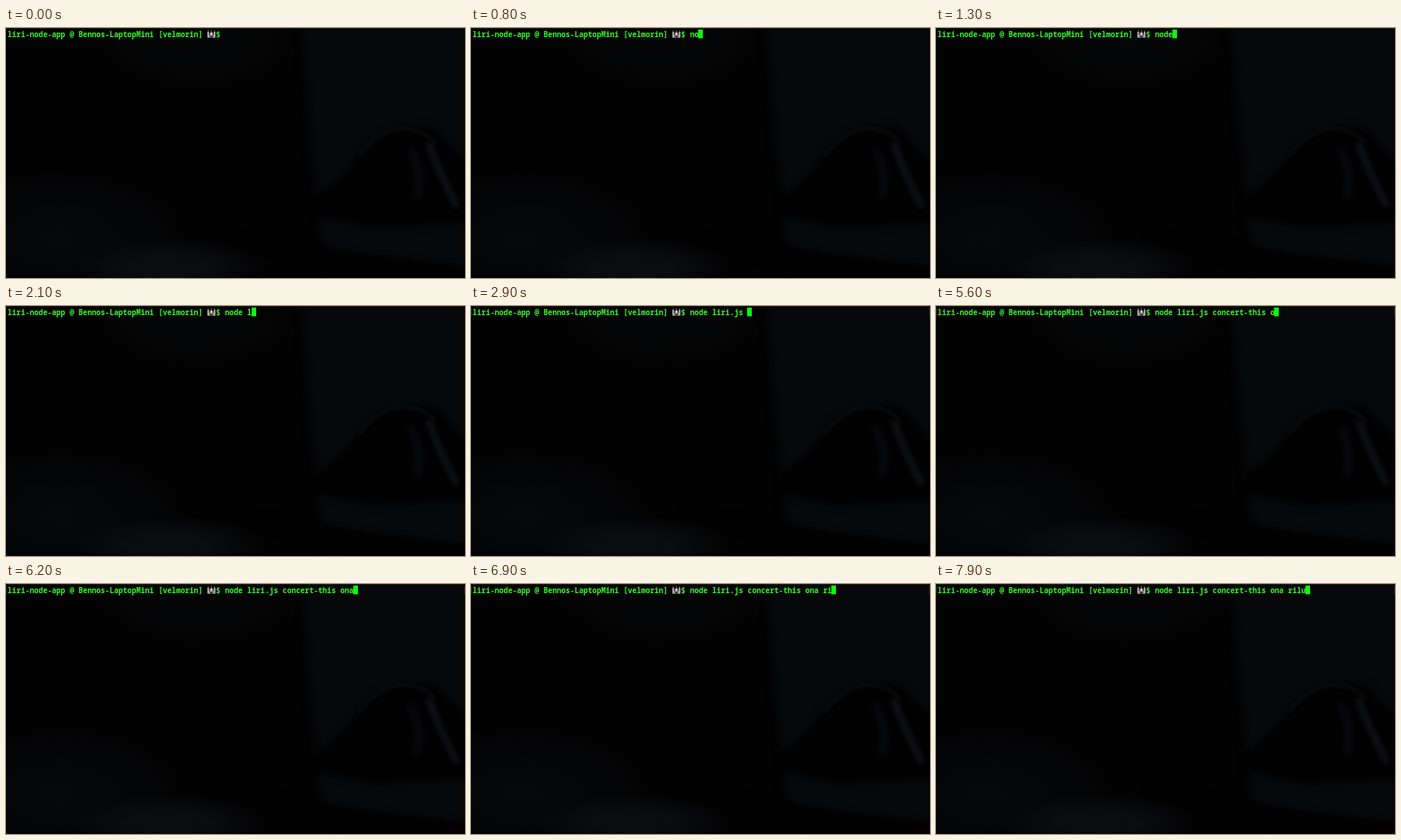
These frames come from a looping animation (600x328 px, 8 s). An HTML page with a canvas:

```html
<!DOCTYPE html>
<html lang="en">
<head>
<meta charset="utf-8">
<title>Terminal</title>
<style>
  html, body { margin: 0; width: 100%; height: 100%; overflow: hidden; background: #010102; }
  canvas { display: block; width: 600px; height: 328px; }
</style>
</head>
<body>
<canvas id="stage"></canvas>
<script>
const W = 600, H = 328, LOOP = 8000;
const CELL = 5.8, LEFT = 2, BASE = 12;
const GREEN = '#32fa24', CURSOR = '#08ff0c';
const PROMPT = 'liri-node-app @ Bennos-LaptopMini [velmorin] ';
const CASTLE_COL = PROMPT.length, DOLLAR_COL = CASTLE_COL + 2, INPUT_COL = DOLLAR_COL + 2;
const COMMAND = 'node liri.js concert-this ona rilu';

// [time in ms, characters of the command on screen]
const KEYS = [
  [0, 0], [600, 1], [800, 2], [1100, 3], [1300, 4], [1500, 5],
  [1900, 6], [2200, 7], [2900, 13], [3600, 25], [4400, 26],
  [5600, 27], [5800, 28], [6000, 29], [6300, 30],
  [6600, 31], [6900, 32], [7300, 33], [7500, 34]
];
const CURSOR_ON = 100, MARKS_ON = 2900;

const dpr = window.devicePixelRatio || 1;

function prepare(canvas) {
  canvas.width = W * dpr;
  canvas.height = H * dpr;
  const c = canvas.getContext('2d');
  c.scale(dpr, dpr);
  return c;
}

const ctx = prepare(document.getElementById('stage'));
const backdrop = document.createElement('canvas');
paintBackdrop(prepare(backdrop));

function rect(c, color, x, y, w, h) {
  c.fillStyle = color;
  c.fillRect(x, y, w, h);
}

function glow(c, x, y, rx, ry, rgb, alpha) {
  c.save();
  c.translate(x, y);
  c.scale(rx, ry);
  const g = c.createRadialGradient(0, 0, 0, 0, 0, 1);
  g.addColorStop(0, `rgba(${rgb},${alpha})`);
  g.addColorStop(0.45, `rgba(${rgb},${alpha * 0.75})`);
  g.addColorStop(1, `rgba(${rgb},0)`);
  rect(c, g, -1, -1, 2, 2);
  c.restore();
}

function softFill(c, path, color, blur) {
  c.filter = `blur(${blur * dpr}px)`;
  c.fillStyle = color;
  c.fill(new Path2D(path));
  c.filter = 'none';
}

function softLine(c, path, color, width, blur) {
  c.filter = `blur(${blur * dpr}px)`;
  c.strokeStyle = color;
  c.lineWidth = width;
  c.stroke(new Path2D(path));
  c.filter = 'none';
}

function paintBackdrop(c) {
  rect(c, '#020203', 0, 0, W, H);
  softFill(c, 'M385 -20 L620 -20 V350 H440 Q405 290 404 200 Z', '#070809', 6);
  glow(c, 250, 15, 140, 70, '6,7,8', 0.6);
  glow(c, 70, 275, 170, 90, '9,11,13', 0.5);
  glow(c, 215, 314, 125, 38, '16,18,20', 0.75);
  // wrist watch
  softFill(c, 'M400 225 Q445 195 465 160 Q495 125 560 130 L610 185 V255 L480 262 L400 245 Z', '#010102', 5);
  softLine(c, 'M462 168 Q485 134 520 132 Q548 134 562 152', '#0b0c0d', 4, 2);
  softLine(c, 'M552 150 Q566 190 590 235', '#0f1012', 9, 3);
  softLine(c, 'M528 158 Q546 190 536 225', '#0a0b0d', 8, 4);
  // pen
  softFill(c, 'M273 270 L350 276 L470 296 L600 312 V340 H470 L350 295 Z', '#010102', 3);
  rect(c, '#202020', 0, 0, W, 0.8);
}

const colX = col => LEFT + col * CELL;

function drawText(text, col) {
  ctx.fillStyle = GREEN;
  [...text].forEach((ch, i) => ctx.fillText(ch, colX(col + i), BASE));
}

function drawCastle(x) {
  const block = (...args) => rect(ctx, ...args);
  block('#77716e', x + 1, 7, 9, 6);
  block('#b9b4b1', x + 0.3, 5, 2.2, 7.5);
  block('#b9b4b1', x + 8.5, 5, 2.2, 7.5);
  block('#c9c5c2', x + 4, 6, 3, 3.5);
  block('#6b5d5a', x + 0.8, 3, 1.2, 2);
  block('#6b5d5a', x + 9, 3, 1.2, 2);
  block('#8c6b64', x + 4.9, 3, 1.2, 3);
  block('#2b2726', x + 2.6, 5, 1.2, 4);
  block('#2b2726', x + 7.2, 5, 1.2, 4);
  block('#3a3230', x + 4.3, 10, 2.4, 3);
}

// Line brackets at both window edges
function drawMarks() {
  ctx.strokeStyle = '#3c3c3c';
  ctx.lineWidth = 0.7;
  for (const [edge, lip] of [[0.5, 1.6], [W - 0.5, W - 1.6]]) {
    ctx.beginPath();
    ctx.moveTo(lip, 3.5);
    ctx.lineTo(edge, 3.5);
    ctx.lineTo(edge, 12.5);
    ctx.lineTo(lip, 12.5);
    ctx.stroke();
  }
}

function typedAt(t) {
  let count = 0;
  for (const [time, n] of KEYS) if (t >= time) count = n;
  return count;
}

function draw(t) {
  const count = typedAt(t);
  ctx.drawImage(backdrop, 0, 0, W, H);
  ctx.font = '600 9.67px "Noto Sans Mono", "DejaVu Sans Mono", monospace';
  drawText(PROMPT, 0);
  drawCastle(colX(CASTLE_COL));
  drawText('$', DOLLAR_COL);
  drawText(COMMAND.slice(0, count), INPUT_COL);
  if (t >= CURSOR_ON) rect(ctx, CURSOR, Math.floor(colX(INPUT_COL + count)), 2, 6, 11.5);
  if (t >= MARKS_ON) drawMarks();
}

const start = performance.now();
function frame() {
  draw((performance.now() - start) % LOOP);
  requestAnimationFrame(frame);
}
frame();
</script>
</body>
</html>
```
